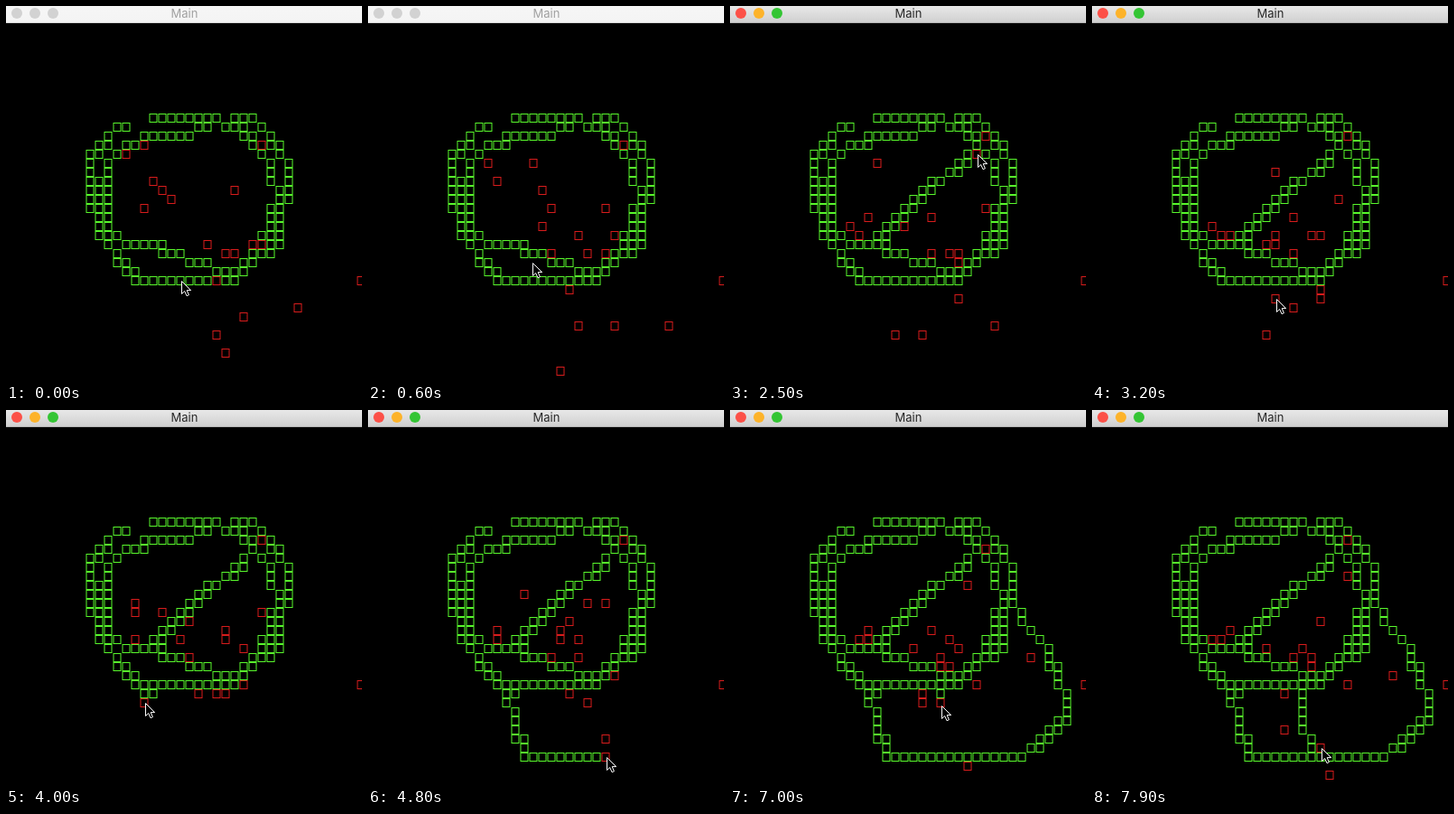
Animation of 394x416 px, one loop 8 s. Source, as an HTML page with a canvas:

```html
<!DOCTYPE html>
<html>
<head>
<meta charset="utf-8">
<style>
html, body { margin: 0; width: 394px; height: 416px; overflow: hidden; background: #000; }
canvas { display: block; }
</style>
</head>
<body>
<canvas id="stage" width="394" height="416"></canvas>
<script>
const ctx = document.getElementById('stage').getContext('2d');
const LOOP = 8000, STEP = 100, EDGE = 39;
const LIGHTS_ON = 800, TITLE_ON = 1000;

// Cells are written as column * 100 + row.
const col = cell => Math.floor(cell / 100);
const row = cell => cell % 100;
const lerp = (a, b, p) => a + (b - a) * p;

// Every cell a polyline passes through.
function trace(corners) {
  const cells = [corners[0]];
  corners.slice(1).forEach((b, i) => {
    const a = corners[i];
    const n = 9 * Math.max(Math.abs(col(b) - col(a)), Math.abs(row(b) - row(a)));
    for (let k = 1; k <= n; k++) {
      const cell = Math.round(lerp(col(a), col(b), k / n)) * 100 +
        Math.round(lerp(row(a), row(b), k / n));
      if (cell !== cells[cells.length - 1]) cells.push(cell);
    }
  });
  return cells;
}

const walls = [
  [1611, 2311], [2112, 2212], [1114, 1015], [2916, 2918], [2921, 2926],
  [2013, 1513, 1514, 1314, 1116, 1125, 1226, 1429, 2529, 2726, 2926],
  [1312, 1212, 915, 921],
  [1018, 1024, 1224, 1325, 1725, 1726, 1926, 2027, 2227, 2328, 2628],
  [2511, 2711, 2913, 2914, 3014, 3015, 3116, 3120],
  [2412, 2612, 2613, 2713, 2714, 2815],
  [3019, 3025, 2825, 2824, 3024]
];

// The mouse goes leg by leg, each at an even pace, and paints on some of them.
const legs = [
  { end: 1300, via: [1929, 1625] },
  { end: 2500, via: [1625, 1624, 2318, 2417, 2517, 2615, 2715], paint: true },
  { end: 3700, via: [2715, 1736, 1630] },
  { end: 4000, via: [1630, 1530, 1531], paint: true },
  { end: 4800, via: [1531, 1632, 1635, 1735, 1737, 2637], paint: true },
  { end: 6000, via: [2637, 3237, 3336, 3436, 3633, 3733, 3730, 3629, 3627, 3527, 3525, 3424],
    paint: true },
  { end: 6450, via: [3424, 3222, 3221, 3121], paint: true },
  { end: 6800, via: [3121, 2330] },
  { end: 7900, via: [2330, 2334, 2435, 2436, 2536], paint: true }
];

// The time at which each green cell appears.
const greenFrom = new Map(walls.flatMap(trace).map(cell => [cell, 0]));
legs.forEach((leg, i) => {
  leg.start = i ? legs[i - 1].end : 0;
  leg.cells = trace(leg.via);
  if (!leg.paint) return;
  const last = leg.cells.length - 1;
  leg.cells.slice(0, last).forEach((cell, k) => {
    if (!greenFrom.has(cell)) greenFrom.set(cell, lerp(leg.start, leg.end, (k + 1) / last));
  });
});
const isGreen = (cell, t) => greenFrom.get(cell) <= t;

function mouseAt(t) {
  const leg = legs.find(l => t < l.end) || legs[legs.length - 1];
  const last = leg.cells.length - 1;
  const pos = last * Math.min(1, (t - leg.start) / (leg.end - leg.start));
  const k = Math.floor(pos);
  const a = leg.cells[k], b = leg.cells[Math.min(k + 1, last)];
  return {
    cell: a,
    x: 10 * lerp(col(a), col(b), pos - k) + 4,
    y: 10 * lerp(row(a), row(b), pos - k) + 14
  };
}

let seed = 7;
function random() {
  seed = (seed * 16807) % 2147483647;
  return seed / 2147483647;
}

// A walker strays one cell at a time, is stopped by green cells,
// leans towards the middle rows and rests once it reaches the edge.
function walk(cell, t) {
  if (col(cell) >= EDGE) return cell;
  const side = (Math.floor(random() * 3) - 1) * 100;
  if (!isGreen(cell + side, t)) cell += side;
  const rise = random() < 0.15 ? Math.sign(27 - row(cell)) : Math.floor(random() * 3) - 1;
  return isGreen(cell + rise, t) ? cell : cell + rise;
}

const walks = [[
  1514, 2814, 1315, 1618, 1719, 1820, 2519, 1521, 2225, 2725,
  2825, 2426, 2526, 2329, 3929, 3232, 2633, 2335, 2437
]];
for (let t = STEP; t < LOOP; t += STEP)
  walks.push(walks[walks.length - 1].map(cell => walk(cell, t)));

function box(cell, color) {
  ctx.strokeStyle = color;
  ctx.strokeRect(col(cell) * 10 - 1, row(cell) * 10 + 9.5, 8, 9);
}

function drawTitle(t) {
  const active = t >= LIGHTS_ON;
  const shade = ctx.createLinearGradient(0, 0, 0, 18);
  shade.addColorStop(0, active ? '#e8e8e8' : '#f6f6f6');
  shade.addColorStop(1, active ? '#d0d0d0' : '#f4f4f4');
  ctx.fillStyle = shade;
  ctx.fillRect(0, 0, 394, 18);
  ctx.fillStyle = active ? '#b4b4b4' : '#d8d8d8';
  ctx.fillRect(0, 18, 394, 1);
  ['#fc5148', '#fdb32a', '#34c534'].forEach((color, i) => {
    ctx.beginPath();
    ctx.arc(12 + 20 * i, 8, 6, 0, Math.PI * 2);
    ctx.fillStyle = active ? color : '#d2d2d2';
    ctx.fill();
  });
  ctx.font = '13px Inter, sans-serif';
  ctx.textAlign = 'center';
  ctx.fillStyle = t >= TITLE_ON ? '#282828' : '#a0a0a0';
  ctx.fillText('Main', 197.5, 13);
}

const arrow = new Path2D('M.5 .5V14.5L3.7 11.5L6 16.7L8.4 15.7L6.2 10.6H10.6Z');
function drawMouse({ x, y }) {
  ctx.save();
  ctx.translate(Math.round(x), Math.round(y));
  ctx.fillStyle = '#000';
  ctx.fill(arrow);
  ctx.strokeStyle = '#fff';
  ctx.stroke(arrow);
  ctx.restore();
}

function draw(t) {
  const mouse = mouseAt(t);
  ctx.fillStyle = '#000';
  ctx.fillRect(0, 0, 394, 416);
  ctx.lineWidth = 1;

  const red = new Set(walks[t / STEP]);
  if (t >= LIGHTS_ON) red.add(mouse.cell);
  for (const cell of greenFrom.keys())
    if (isGreen(cell, t) && !red.has(cell)) box(cell, '#58f82c');
  red.forEach(cell => box(cell, '#d81c1c'));

  drawTitle(t);
  drawMouse(mouse);
}

const begin = performance.now();
function tick() {
  const t = (performance.now() - begin) % LOOP;
  draw(Math.floor(t / STEP) * STEP);
  requestAnimationFrame(tick);
}
tick();
</script>
</body>
</html>
```
